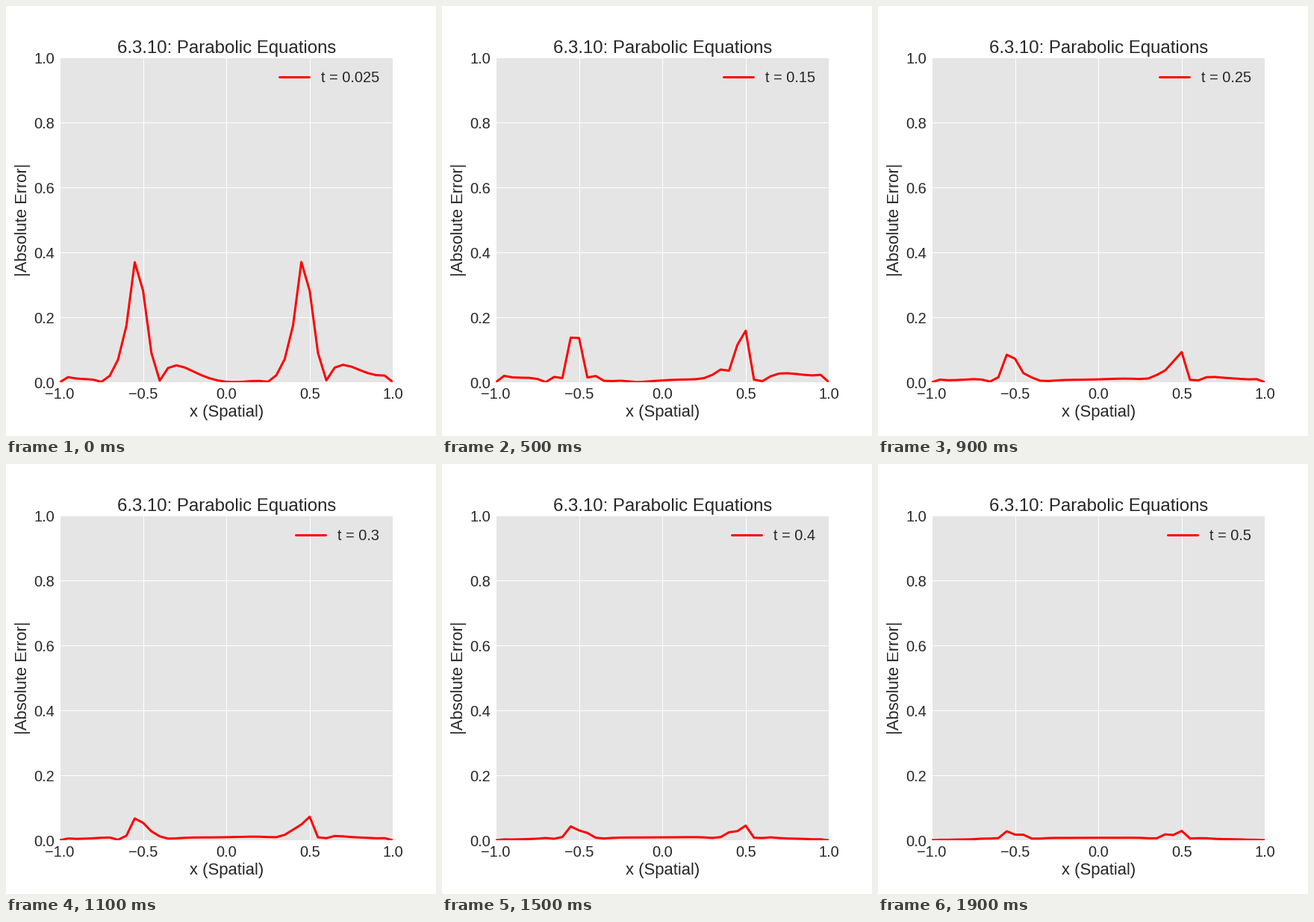
These frames come from a looping animation (576x576 px, 2 s). A matplotlib script:

```python
import numpy as np
import matplotlib.pyplot as plt
from matplotlib.animation import FuncAnimation

plt.rcParams.update({
    "font.family": "Liberation Sans",
    "text.color": "#262626",
    "axes.labelcolor": "#262626",
    "xtick.labelcolor": "#262626",
    "ytick.labelcolor": "#262626",
    "lines.solid_capstyle": "round",
})

STEPS = 20
CELLS = 40
H = 2 / CELLS
MU = 10
K = MU * H * H

x = np.linspace(-1, 1, CELLS + 1)


def exact(t):
    """Fourier solution of the heat equation for a unit pulse on |x| < 1/2."""
    m = np.arange(40)
    w = np.pi * (2 * m + 1)
    terms = (-1.0) ** m * np.cos(np.outer(x, w)) / w * np.exp(-w * w * t)
    return 0.5 + 2 * terms.sum(axis=1)


def solve_errors():
    """Crank-Nicolson steps; end values are refreshed after each solve."""
    n = CELLS + 1
    lap = np.zeros((n, n))
    for j in range(1, n - 1):
        lap[j, j - 1:j + 2] = 1, -2, 1
    left = np.eye(n) - MU / 2 * lap
    right = np.eye(n) + MU / 2 * lap

    j = np.arange(n)
    u = ((j >= CELLS // 4) & (j < 3 * CELLS // 4)).astype(float)
    errors = []
    for step in range(1, STEPS + 1):
        u = np.linalg.solve(left, right @ u)
        true = exact(step * K)
        u[[0, -1]] = true[[0, -1]]
        errors.append(np.abs(u - true))
    return errors


errors = solve_errors()

fig = plt.figure(figsize=(8, 8), dpi=72, facecolor="white")
ax = fig.add_axes([0.125, 0.125, 0.775, 0.755], facecolor="#E5E5E5")
ax.set_axisbelow(True)
ax.grid(color="white", linewidth=1, linestyle="-")
ax.spines[:].set_visible(False)
ax.tick_params(length=0, pad=7, labelsize=20)
ax.set(xlim=(-1, 1), ylim=(0, 1), xticks=np.linspace(-1, 1, 5))
ax.set_title("6.3.10: Parabolic Equations", fontsize=24, pad=6)
ax.set_xlabel("x (Spatial)", fontsize=22, labelpad=4)
ax.set_ylabel("|Absolute Error|", fontsize=22, labelpad=4)

line, = ax.plot(x, errors[0], color="red", linewidth=3, label="t = 0.025")
legend = ax.legend(loc="upper right", fontsize=20, frameon=False)
label = legend.get_texts()[0]


def update(i):
    line.set_ydata(errors[i])
    label.set_text(f"t = {(i + 1) * K:g}")
    return line, label


anim = FuncAnimation(fig, update, frames=STEPS, interval=100,
                     repeat=True, repeat_delay=0, blit=False)
plt.show()
```
